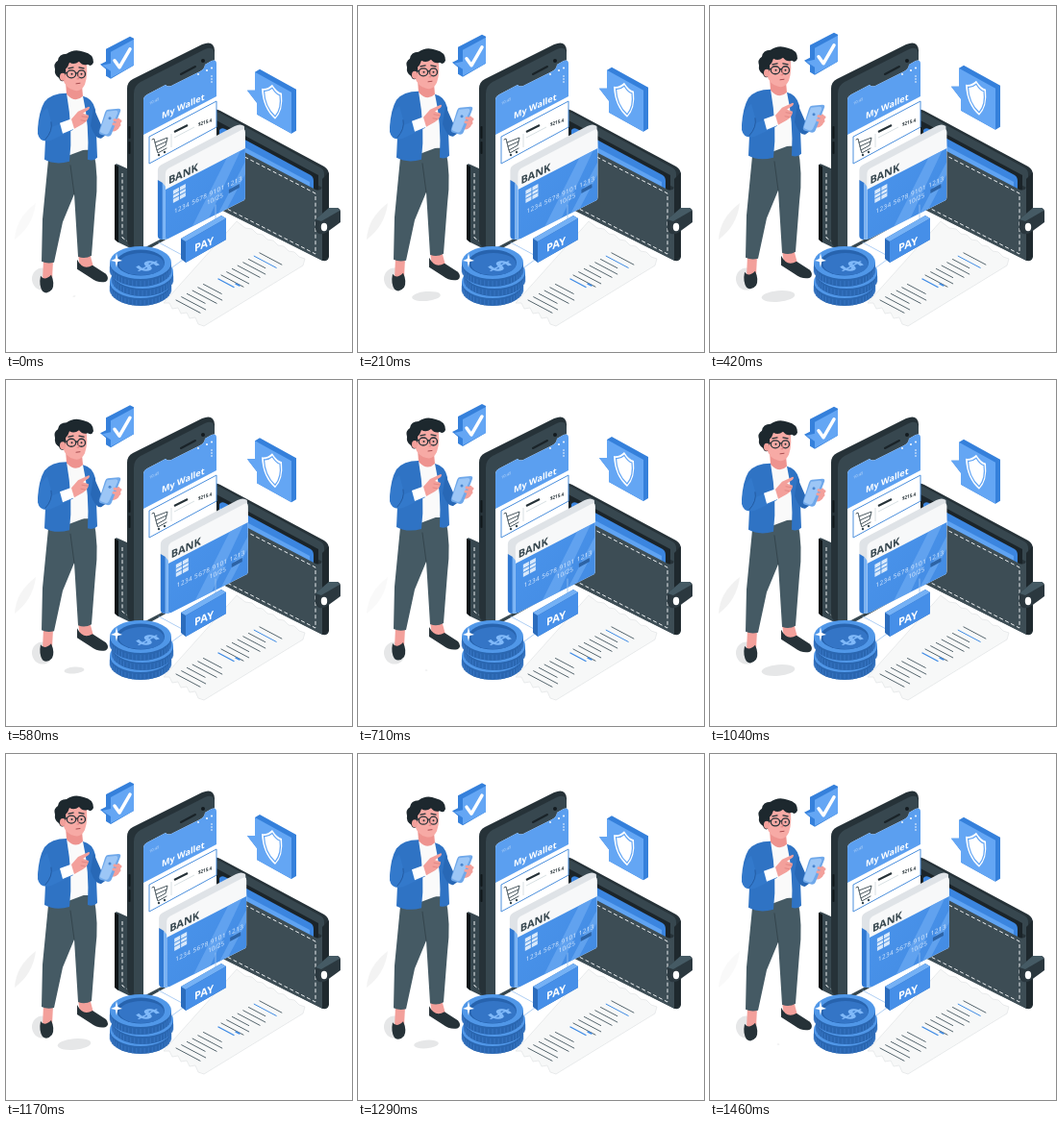
An HTML page for the animation above (1.5 s loop, 360 by 360 pixels).

```html
<!DOCTYPE html>
<html lang="en">
<head>
<meta charset="utf-8">
<style>
html, body { margin: 0; width: 100%; height: 100%; overflow: hidden; background: #fff; }
svg { display: block; width: 100vw; height: 100vh; }
text { font-family: "Open Sans", Lato, sans-serif; font-weight: 700; }
.line { fill: none; stroke-linecap: round; stroke-linejoin: round; }
.stitch { fill: none; stroke: #eceff1; stroke-width: 1; stroke-dasharray: 4 2.6; }
.light { font-weight: 400; }
</style>
</head>
<body>
<svg viewBox="0 0 360 360">
  <defs>
    <linearGradient id="blue" x2="1" y2="1">
      <stop stop-color="#4c96ee"/><stop offset="1" stop-color="#4189e0"/>
    </linearGradient>
    <clipPath id="band"><path d="M166 191 249 148V199Q249 202 246 203L169 242Q166 243 166 240Z"/></clipPath>
  </defs>

  <g fill="#e6e7e8">
    <path id="leafShadow" d="M9 243Q10 221 31 205Q28 229 9 243Z" fill="#f1f1f1"/>
    <ellipse cx="38" cy="284" rx="11" ry="11.5"/>
    <ellipse id="footShadow" rx="18" ry="6"/>
  </g>

  <!-- wallet -->
  <path d="M113 167Q113 163 117 165L150 180V262L117 246Q113 244 113 240Z" fill="#37474f"/>
  <path d="M113 165 117 167V246L113 243Z" fill="#0e1417"/>
  <path class="stitch" d="M121 174V241L128 246"/>
  <path d="M214 109Q218 106 223 109L331 167Q336 170 336 176V260Q336 266 330 265L214 207Z" fill="#263238"/>
  <path d="M217 110 222 111 327 168Q331 170 331 175V190L217 130Z" fill="#37474f"/>
  <path d="M217 118 325 176V194L217 137Z" fill="#1b2429"/>
  <path d="M222 129Q224 126 228 128L317 176Q320 178 320 182V192L222 139Z" fill="#3b85df"/>
  <path d="M222 133 316 183V190L222 140Z" fill="#5fa3f2"/>
  <path d="M214 134 322 191Q328 193 329 188V265L214 207Z" fill="#3d4d55"/>
  <path d="M329 180 336 173V261L329 265Z" fill="#1f292e"/>
  <path class="stitch" d="M225 145 322 195V258L226 209"/>
  <path d="M322 222 336 210 345 210Q348 211 348 214V225L333 236Q324 240 322 232Z" fill="#2b383f"/>
  <path d="M322 222 336 210 345 210Q347 211 347 213L328 224Z" fill="#455a64"/>
  <ellipse cx="331" cy="230" rx="3.2" ry="4.2" fill="#fff"/>

  <!-- receipt -->
  <path d="M164 309 170 309 173 315 179 314 182 320 188 319 191 325 197 324 200 331 206 333 309 270 311 263 305 261 300 256 294 255 289 250 283 249 278 244 272 243 267 238 261 237 256 232 249 231 240 224Z" fill="#f7f8f8" stroke="#e4e6e7" stroke-width=".8"/>
  <g id="receiptText" class="line"></g>

  <!-- phone -->
  <path d="M126 86Q126 79 132 76L204 40Q216 35 217 46V214L142 256Q126 252 126 244Z" fill="#263238"/>
  <path d="M133 91Q133 83 140 79L207 45Q217 41 217 51V215L141 257Q133 256 133 248Z" fill="#37474f"/>
  <path d="M128.500 126V137M128.500 142V153" class="line" stroke="#11181b" stroke-width="2"/>
  <path d="M143 98Q143 94 147 92L166 82Q169 85 174 82L202 68Q207 65 207 61L214 57Q219 55 219 60V212L143 252Z" fill="#fff"/>
  <path d="M143 98Q143 94 147 92L166 82Q169 85 174 82L202 68Q207 65 207 61L214 57Q219 55 219 60V94L143 134Z" fill="#5b9ff0"/>
  <path d="M182 71 197 63" class="line" stroke="#1a2328" stroke-width="2"/>
  <circle cx="205" cy="57" r="2" fill="#141b1f"/>
  <g fill="#fff">
    <text transform="matrix(1 -.45 0 1 162 117.500)" font-size="9">My Wallet</text>
    <text transform="matrix(1 -.5 0 1 149 103)" font-size="4" opacity=".7" class="light">10:45</text>
    <circle cx="200" cy="71" r=".9"/><circle cx="209" cy="67" r="1"/><circle cx="214" cy="64.500" r="1"/>
    <circle cx="214" cy="73" r=".8"/><circle cx="214" cy="76" r=".8"/><circle cx="214" cy="79" r=".8"/>
  </g>
  <path d="M149 136 219 99V126L149 164Z" fill="#fff" stroke="#4b8fdd"/>
  <path d="M152 139 154 138 157 150 166 145 168 137 155 142M157 150 158 153 167 148M156 146 167 141" class="line" stroke="#37474f" stroke-width=".9"/>
  <circle cx="159" cy="155" r="1.200" fill="#37474f"/><circle cx="165" cy="152" r="1.200" fill="#37474f"/>
  <path d="M175 131 189 124" stroke="#263238" stroke-width="2"/>
  <path d="M172 133V147M175 137 196 126" stroke="#cfd8dc" stroke-width=".8"/>
  <text transform="matrix(.9 -.3 0 1 200 125)" font-size="5" fill="#263238">$215.4</text>

  <g id="card">
    <path d="M158 171Q158 167 162 165L238 125Q244 122 248 125L249 148 166 242 162 243Q158 242 158 239Z" fill="#dfe3e7"/>
    <path d="M158 181 163 184V243Q158 243 158 239Z" fill="#2f78d2"/>
    <path d="M163 184 167 189V243H163Z" fill="#79b3f5"/>
    <path d="M166 175Q166 171 169 169L245 129Q249 127 249 131V199Q249 202 246 203L169 242Q166 243 166 240Z" fill="#f7f8f9"/>
    <g clip-path="url(#band)">
      <path d="M160 140H255V250H160Z" fill="url(#blue)"/>
      <path d="M186 245 235 148 249 140 203 238ZM211 235 249 162V175L220 230Z" fill="#74b0f5" opacity=".6"/>
    </g>
    <text transform="matrix(1 -.46 0 1 169 185.500)" font-size="11" fill="#37474f">BANK</text>
    <path d="M174 192 187 185V198L174 205Z" fill="#d9e9fb"/>
    <path d="M174 196.500 187 189.500M174 200.500 187 193.500M180.500 188V202" stroke="#4b91e2"/>
    <g fill="#e4f0ff" font-size="6.400">
      <text transform="matrix(1 -.49 0 1 175 216)" letter-spacing=".4" class="light">1234 5678 9101 1213</text>
      <text transform="matrix(1 -.49 0 1 209 207)" class="light">10/25</text>
    </g>
    <path d="M232 191 243 185V189L232 195Z" fill="#2d63a5"/>
  </g>

  <!-- pay button -->
  <path d="M159 246 183 259M173 281V272L184 264M218 207V222" class="line" stroke="#9bc3f1" stroke-width=".8"/>
  <path d="M182 242 224 218 229 221V243L187 267 182 263Z" fill="#2b6cbd"/>
  <path d="M182 242 224 218 229 221 187 245Z" fill="#75b1f5"/>
  <path d="M187 245 229 221V243L187 267Z" fill="#468fe8"/>
  <text transform="matrix(1 -.42 0 1 196 256)" font-size="11" fill="#fff">PAY</text>

  <g id="coins"></g>
  <ellipse cx="140" cy="267" rx="25" ry="13.500" fill="#2763ae"/>
  <ellipse cx="141" cy="268.500" rx="23.500" ry="11.500" fill="#3475c6"/>
  <text transform="matrix(.95 .42 -.95 .5 139 275)" font-size="25" text-anchor="middle" fill="#80b9f9">$</text>
  <path d="M115 257 116.300 263 121 265 116.300 266 115 272 113.700 266 109 265 113.700 263Z" fill="#fff"/>

  <g id="man">
    <path d="M39 264 49 265 48 284 38 286ZM75 258 87 257 91 272 77 273Z" fill="#f3a09b"/>
    <path d="M36 281Q40 287 47 280Q51 289 48 295Q43 301 38 297Q34 291 36 281Z" fill="#263238"/>
    <path d="M74 264Q80 276 90 270L104 279Q108 284 104 287Q96 289 88 283L74 274Z" fill="#263238"/>
    <path d="M45 150H91Q97 178 93 208L89 260Q82 264 75 261L71 196 59 225 50 267Q43 269 37 266L38 222Z" fill="#455a64"/>
    <path d="M71 196 67 166" class="line" stroke="#34454d"/>
    <path d="M61 92Q72 88 83 95L86 148 62 157Z" fill="#fafafa"/>
    <path d="M62 79 79 83 80 94Q72 102 63 92Z" fill="#ee938f"/>
    <path d="M63 91Q47 91 40 100Q34 110 33 129Q33 138 41 139L40 160Q51 166 66 162Q70 130 63 91Z" fill="#2f73c4"/>
    <path d="M80 94Q90 96 93 108L95 158Q91 162 85 160Q87 124 80 94Z" fill="#2f73c4"/>
    <path d="M91 106 99 124 111 120 113 128 99 138Q93 139 88 125Z" fill="#2868b6"/>
    <path d="M108 121Q111 116 118 117Q121 122 117 128Q112 133 108 129Z" fill="#f3a09b"/>
    <path d="M106 108 117 107Q120 107 119 110L110 133Q109 136 106 136L99 134Q96 133 97 130L103 111Q104 108 106 108Z" fill="#6fa8ea"/>
    <path d="M105 110 114 109Q117 109 116 112L107 132Q106 134 104 134L99 132Q97 131 98 129Z" fill="#9cc6f6"/>
    <circle cx="108" cy="117" r="1.500" fill="#4a86cf"/>
    <path d="M113 119 119 120M112 123 118 124" class="line" stroke="#f3a09b" stroke-width="3"/>
    <path d="M43 106Q47 119 48 126L66 119 70 129 47 140Q35 143 33 133Q34 112 43 106Z" fill="#3379cb"/>
    <path d="M47 121Q49 130 41 139" class="line" stroke="#235ba2"/>
    <path d="M56 122 67 118 71 128 59 133Z" fill="#fff"/>
    <path d="M68 118 75 110 86 105Q88 105 86 108L80 112 86 114Q86 119 80 123L71 128Z" fill="#f3a09b"/>
    <path d="M79 115 85 116M78 119 83 120" class="line" stroke="#da7d7c" stroke-width=".7"/>
    <path d="M58 60Q70 51 83 56Q86 70 82 82Q78 90 71 88Q62 86 59 76Z" fill="#f7aaa5"/>
    <path d="M51 66Q49 60 54 57Q55 50 63 50Q71 44 81 48Q91 50 91 59Q89 64 85 61Q80 63 76 58Q71 62 66 59Q65 63 62 66Q63 71 60 78Q57 80 55 75Q50 72 51 66Z" fill="#1d282e"/>
    <ellipse cx="59" cy="74" rx="3" ry="4" fill="#f3a09b"/>
    <g class="line" stroke="#263238">
      <ellipse cx="68" cy="71" rx="4.700" ry="4" stroke-width="1.300"/>
      <ellipse cx="78.500" cy="71" rx="4" ry="4" stroke-width="1.300"/>
      <path d="M60 69 63.500 70M72.500 70H74.500M65 65 70 64M76 64 81 65" stroke-width="1.300"/>
      <path d="M73 81 77 80.500" stroke="#a84e51"/>
    </g>
    <circle cx="68.500" cy="71" r="1" fill="#263238"/><circle cx="78.500" cy="71" r="1" fill="#263238"/>
    <path d="M75 71 76 76 74 76" class="line" stroke="#dd7d7d" stroke-width=".8"/>
  </g>

  <g id="checkBadge">
    <path d="M104 45 129 32 133 34V62L109 76 104 73V66L98 61 104 58Z" fill="#3580db"/>
    <path d="M109 48 133 35V62L109 75V68L100 62 109 60Z" fill="#64a6f4"/>
    <path d="M113 57 118 64 129 45" class="line" stroke="#fff" stroke-width="3.500"/>
  </g>

  <g id="shieldBadge">
    <path d="M259 69 264 66 302 87V130L297 133 261 113V101L251 88 259 88Z" fill="#3580db"/>
    <path d="M259 69 297 90V133L261 113V101L251 88 259 88Z" fill="#64a6f4"/>
    <path d="M277 82Q282 90 287 91Q289 109 280 118Q267 107 266 86Q272 87 277 82Z" fill="#fff"/>
    <path d="M277 85.500Q281 92 285 93Q287 107 280 115Q269 105 268.500 88.500Q273 89 277 85.500Z" fill="none" stroke="#64a6f4" stroke-width="1.200"/>
  </g>
</svg>
<script>
const LOOP = 1500, SCALE = .72, LEAD = 20;
const SHAKE = [0, -1, 2, -4, 4, -4, 4, -4, 2, -1, 0];
const byId = id => document.getElementById(id);
const move = (id, x, y) => byId(id).setAttribute("transform", `translate(${x} ${y})`);

function textBlock(x, y, rows, length) {
  let out = "";
  for (let i = 0; i < rows; i++) {
    const len = length * (i % 3 === 2 ? .75 : 1);
    const color = i === 6 ? "#3f8be5" : "#56666e";
    out += `<path d="M${x + i * 5.7} ${y - i * 3.3}l${len} ${len * .53}" stroke="${color}"/>`;
  }
  return out;
}
byId("receiptText").innerHTML = textBlock(224, 280, 8, 23) + textBlock(177, 306, 6, 25)
  + '<path d="M221 284l16 8.500M239 289l4 2" stroke="#3f8be5" stroke-width="1.4"/>';

function coin(x, y) {
  let ridges = "";
  for (let i = 1; i < 24; i++) {
    const a = i * Math.PI / 24;
    ridges += `M${x + 32 * Math.cos(a)} ${y + 17 * Math.sin(a) + 2}v6`;
  }
  return `<path d="M${x - 32} ${y}v8a32 17 0 0 0 64 0v-8Z" fill="#2a66b0"/>
    <path d="${ridges}" stroke="#3a79c8" stroke-width=".8"/>
    <ellipse cx="${x}" cy="${y}" rx="32" ry="17" fill="#5097e8"/>`;
}
byId("coins").innerHTML = coin(140, 287) + coin(142, 277) + coin(140, 267);

// Piecewise linear value through evenly spaced stops
function along(stops, phase) {
  const pos = phase * (stops.length - 1), i = Math.floor(pos);
  return stops[i] + (stops[i + 1] - stops[i]) * (pos - i);
}

function draw(now) {
  const phase = (now + LEAD) % LOOP / LOOP;
  const lift = along([0, -10, 0], phase) * SCALE;
  const spread = Math.abs(Math.sin(phase * 2 * Math.PI));
  for (const id of ["man", "checkBadge", "shieldBadge"]) move(id, 0, lift);
  move("card", along(SHAKE, phase) * SCALE, 0);
  byId("footShadow").setAttribute("transform", `translate(71 302) rotate(-5) scale(${spread})`);
  byId("leafShadow").setAttribute("opacity", .4 + .6 * spread);
  requestAnimationFrame(draw);
}
draw(performance.now());
</script>
</body>
</html>
```
